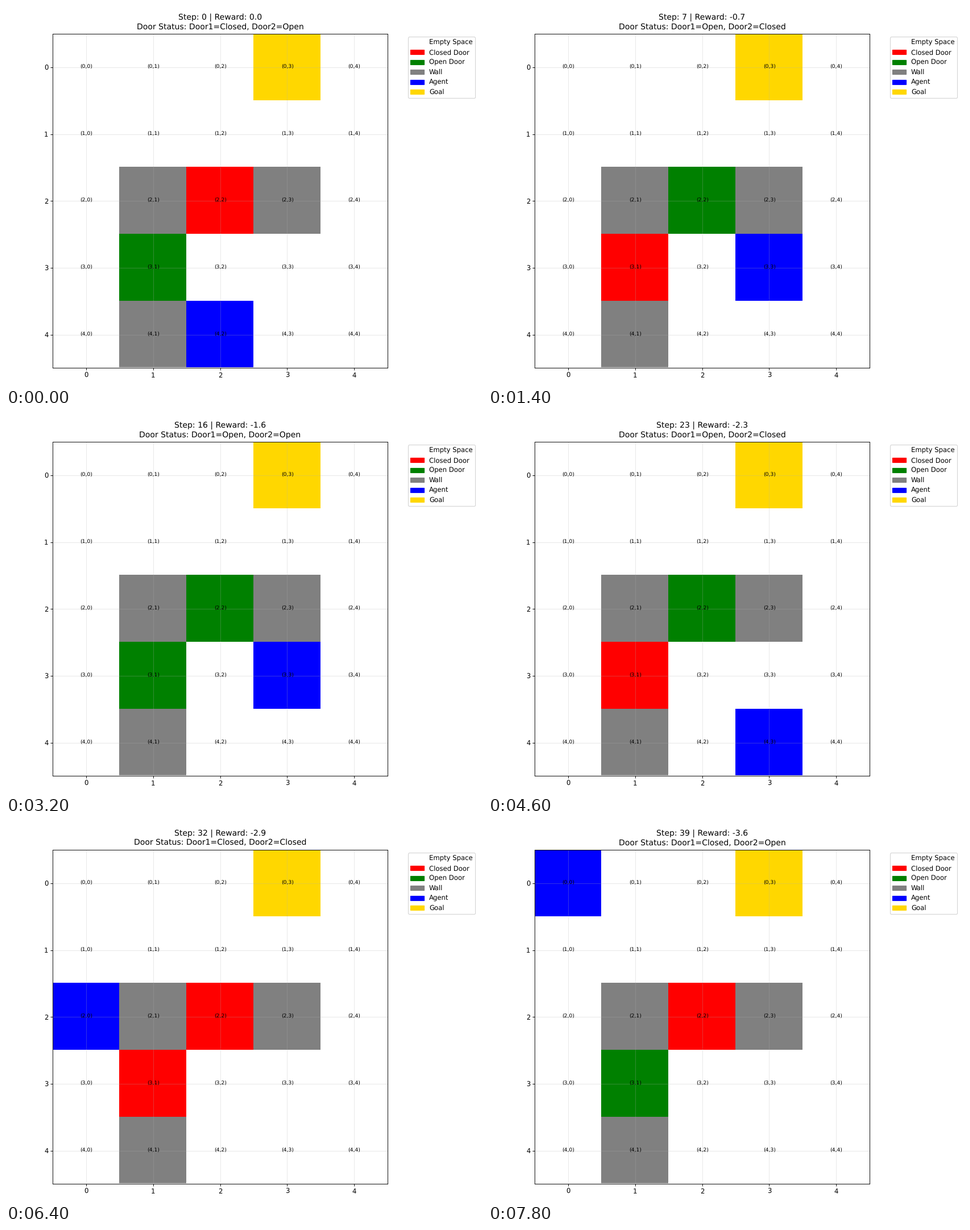
A matplotlib script that plays this animation: 837 px wide and 669 px high, repeating every 8000 ms.

```python
import matplotlib.pyplot as plt
from matplotlib.animation import FuncAnimation
from matplotlib.patches import Patch, Rectangle

W, H, DPI = 837, 669, 83.625
STEPS, INTERVAL, N = 40, 200, 5

# Axes box, cell edges and grid lines in stage pixels
LEFT, RIGHT, TOP, BOTTOM = 82, 671, 49, 637
X_EDGES = [82, 199, 317, 435, 553, 671]
Y_EDGES = [48, 166, 283, 401, 519, 636]
X_MID = [141.1 + 117.75 * i for i in range(N)]
Y_MID = [107.9 + 117.7 * i for i in range(N)]

WALLS = [(2, 1), (2, 3), (4, 1)]
DOORS = [(2, 2), (3, 1)]
GOAL = (0, 3)
START = (4, 2)

# One letter per step, a dot means the agent waits
MOVES = "U.R.D.U.LR.D.U..LRR.D.LULLL...U.U.U...."
SHIFT = {"U": (-1, 0), "D": (1, 0), "L": (0, -1), "R": (0, 1), ".": (0, 0)}

# Steps at which each door toggles
TOGGLES = [(4, 20, 22, 31), (4, 9, 17, 25, 29, 38)]
FIRST_OPEN = [False, True]


def walk():
    """Agent cell and total reward at every step."""
    pos, reward = START, 0.0
    path = [(pos, reward)]
    for move in MOVES:
        dr, dc = SHIFT[move]
        pos = (pos[0] + dr, pos[1] + dc)
        reward += 0.2 if pos in DOORS else -0.1
        path.append((pos, reward))
    return path


def is_open(door, step):
    flips = sum(t <= step for t in TOGGLES[door])
    return FIRST_OPEN[door] ^ (flips % 2 == 1)


PATH = walk()

plt.rcParams["text.hinting"] = "none"
fig = plt.figure(figsize=((W + 1e-6) / DPI, H / DPI), dpi=DPI, facecolor="white")
ax = fig.add_axes([LEFT / W, 1 - BOTTOM / H, (RIGHT - LEFT) / W, (BOTTOM - TOP) / H])
ax.set_xlim(LEFT, RIGHT)
ax.set_ylim(BOTTOM, TOP)
ax.set_xticks(X_MID, range(N))
ax.set_yticks(Y_MID, range(N))
ax.tick_params(pad=3)
ax.grid(True, alpha=0.3)

cells = {}
for r in range(N):
    for c in range(N):
        x, y = X_EDGES[c], Y_EDGES[r]
        cells[r, c] = ax.add_patch(Rectangle(
            (x, y), X_EDGES[c + 1] - x, Y_EDGES[r + 1] - y,
            facecolor="white", linewidth=0, antialiased=False, zorder=0))
        ax.text(X_MID[c] + 0.4, Y_MID[r] - 0.5, f"({r},{c})",
                ha="center", va="center", fontsize=8, color="black")

KEY = [("white", "Empty Space"), ("red", "Closed Door"), ("green", "Open Door"),
       ("gray", "Wall"), ("blue", "Agent"), ("gold", "Goal")]
ax.legend(handles=[Patch(color=color, label=label) for color, label in KEY],
          bbox_to_anchor=(1.051, 1.001), loc="upper left")
title = ax.set_title("", pad=7.1)


def draw(step):
    pos, reward = PATH[step]
    opened = [is_open(d, step) for d in range(2)]
    colors = {cell: "gray" for cell in WALLS}
    colors[GOAL] = "gold"
    for cell, state in zip(DOORS, opened):
        colors[cell] = "green" if state else "red"
    colors[pos] = "blue"
    for cell, rect in cells.items():
        rect.set_facecolor(colors.get(cell, "white"))
    d1, d2 = ("Open" if state else "Closed" for state in opened)
    title.set_text(f"Step: {step} | Reward: {reward:.1f}\n"
                   f"Door Status: Door1={d1}, Door2={d2}")
    return [title, *cells.values()]


anim = FuncAnimation(fig, draw, frames=STEPS, interval=INTERVAL,
                     init_func=lambda: draw(0), repeat=True, repeat_delay=0,
                     blit=False)
plt.show()
```
